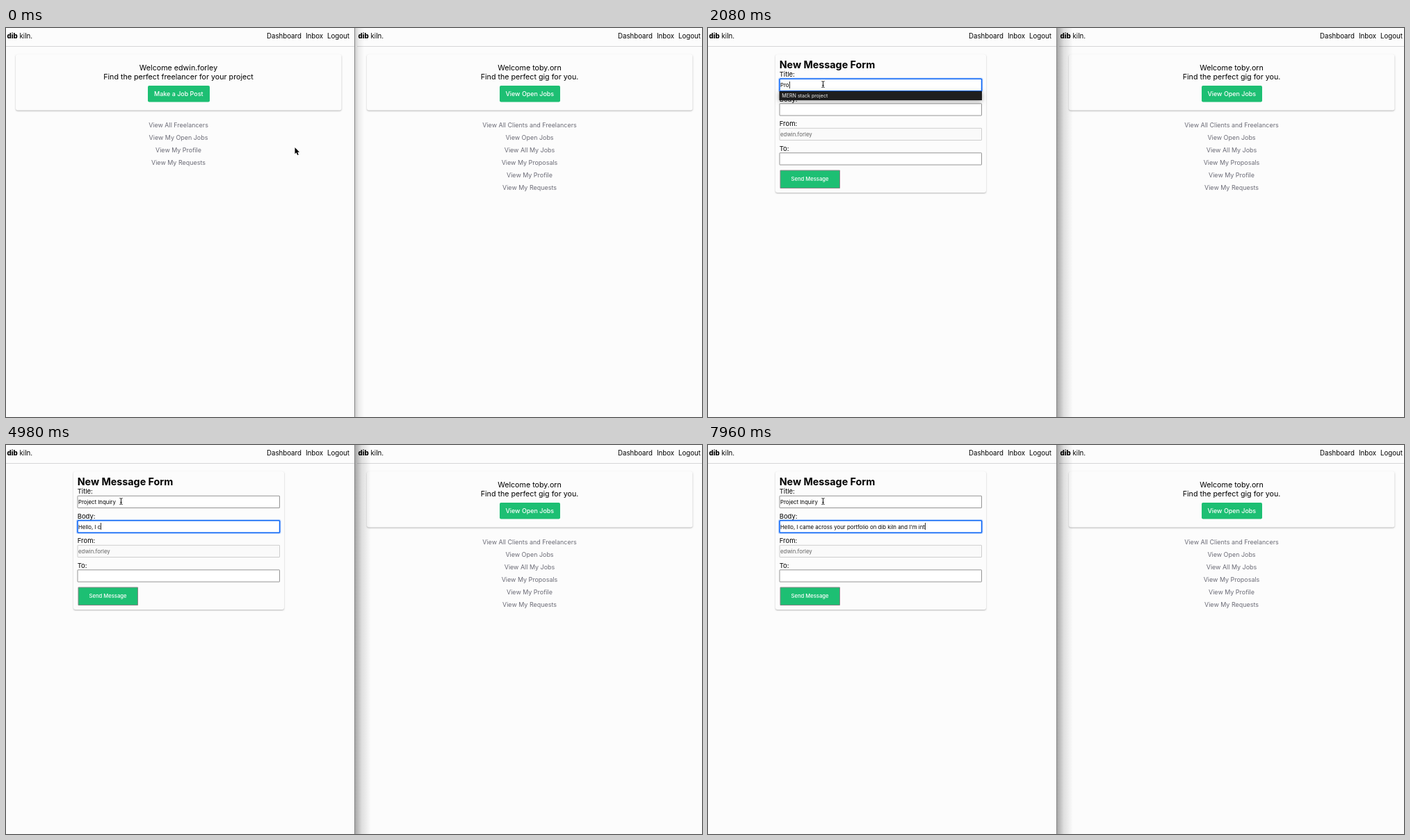
An HTML page with a canvas that plays this animation: 1001 px wide and 560 px high, repeating every 8 s.

```html
<!DOCTYPE html>
<html lang="en">
<head>
<meta charset="utf-8">
<title>Message form</title>
<style>
html, body { margin: 0; width: 100%; height: 100%; overflow: hidden; background: #fcfcfc; }
canvas { display: block; width: 1001px; height: 560px; }
</style>
</head>
<body>
<canvas id="stage"></canvas>
<script>
const W = 1001, H = 560, LOOP = 8000;
const PAGE = '#fcfcfc', INK = '#000', GREEN = '#1dbf73', GREY = '#6b6b76';
const CLIENT = 'edwin.forley', WORKER = 'toby.orn';
const TITLE = 'Project Inquiry';
const BODY = "Hello, I came across your portfolio on dib kiln and I'm int";

// [time, visible characters]
const TITLE_KEYS = [[1840, 0], [2080, 3], [2090, 3], [2530, 12], [2889, 12], [2940, 10],
  [3000, 10], [3280, 15], [3729, 15], [3780, 13], [3930, 13], [4030, 15]];
const BODY_KEYS = [[4580, 0], [4980, 10], [5410, 17], [5510, 17], [6100, 31], [6330, 35],
  [6455, 35], [7080, 47], [7435, 47], [7960, 59]];
const CARET_OFF = [[1370, 1570], [1720, 1920], [2680, 2830], [3430, 3580], [3780, 3980],
  [4280, 4480], [7280, 7480]];
// [time, x, y]
const POINTER = [[160, 415.5, 172], [390, 443, 8], [570, 443, 8], [890, 74, 59.5],
  [1010, 74, 59.5], [1170, 165.5, 81]];

const INBOX_AT = 570, FORM_AT = 880, FOCUS_AT = 1170, BODY_AT = 4080;

const canvas = document.getElementById('stage');
const ctx = canvas.getContext('2d');
const dpr = window.devicePixelRatio || 1;
canvas.width = W * dpr;
canvas.height = H * dpr;

const smooth = u => u * u * (3 - 2 * u);

function sample(keys, t, col, ease = u => u) {
  if (t <= keys[0][0]) return keys[0][col];
  for (let i = keys.length - 1; i >= 0; i--) {
    const a = keys[i], b = keys[i + 1];
    if (t < a[0]) continue;
    return b ? a[col] + (b[col] - a[col]) * ease((t - a[0]) / (b[0] - a[0])) : a[col];
  }
}

const typed = (text, keys, t) => text.slice(0, Math.floor(sample(keys, t, 1)));

function text(str, x, y, size, { weight = 400, color = INK, align = 'left' } = {}) {
  ctx.font = `${weight} ${size}px Inter, "Open Sans", sans-serif`;
  ctx.fillStyle = color;
  ctx.textAlign = align;
  ctx.fillText(str, x, y);
}

function box(x, y, w, h, r, color) {
  ctx.fillStyle = color;
  ctx.beginPath();
  ctx.roundRect(x, y, w, h, r);
  ctx.fill();
}

function outline(x, y, w, h, r, color, width) {
  ctx.strokeStyle = color;
  ctx.lineWidth = width;
  ctx.beginPath();
  ctx.roundRect(x, y, w, h, r);
  ctx.stroke();
}

function shadow(color, blur, dy, draw) {
  ctx.save();
  ctx.shadowColor = color;
  ctx.shadowBlur = blur * dpr;
  ctx.shadowOffsetY = dy * dpr;
  draw();
  ctx.restore();
}

function card(x, y, w, h) {
  shadow('rgba(0,0,0,.28)', 2, 1, () => box(x, y, w, h, 3, PAGE));
}

function header(x) {
  text('dib', x + 1.5, 15, 9.7, { weight: 800 });
  text('kiln.', x + 19.5, 15, 9.7);
  text('Dashboard', x + 375, 15, 9.7);
  text('Inbox', x + 431, 15, 9.7);
  text('Logout', x + 462, 15, 9.7);
  ctx.fillStyle = '#d6d6d8';
  ctx.fillRect(x, 26, 501, 1);
}

function dashboard(x, user, tagline, action, half, links) {
  const mid = x + 248, align = 'center';
  card(x + 14, 38, 468.5, 80.5);
  text('Welcome ' + user, mid, 61, 10.7, { align });
  text(tagline, mid, 74.3, 10.7, { align });
  box(mid + .5 - half, 83, half * 2, 23.5, 2, GREEN);
  text(action, mid + .3, 98, 8.95, { weight: 500, color: '#fff', align });
  links.forEach((label, i) => text(label, mid, 143 + i * 18, 8.95, { color: GREY, align }));
}

function field(label, y, value, state) {
  text(label, 102.7, y - 2, 9.5);
  if (state === 'focus') {
    outline(102, y + .5, 292.5, 19, 1.5, 'rgba(40,120,255,.28)', 2);
    box(102.5, y + 1, 291.5, 18, 1, '#fff');
    outline(103, y + 1.3, 290.6, 17.5, 1, '#0f68f5', 1.6);
  } else {
    const off = state === 'disabled';
    box(102.5, y + 1, 291.5, 17.5, 0, off ? '#fafafa' : '#fff');
    outline(103, y + 1.3, 290.5, 17.2, .5, off ? '#c9c9c9' : '#8a8a8a', .9);
  }
  text(value, 104, y + 13, 7.85, { color: state === 'disabled' ? '#626262' : INK });
}

function caret(value, y) {
  ctx.font = '400 7.85px Inter, "Open Sans", sans-serif';
  ctx.fillStyle = INK;
  ctx.fillRect(Math.round(104 + ctx.measureText(value).width), y, .8, 10);
}

function suggestion() {
  shadow('rgba(0,0,0,.35)', 6, 1.5, () => box(102.5, 91, 291.5, 13, 0, '#1e1e1f'));
  text('MERN stack project', 106.3, 100.3, 7.1, { color: '#efefef' });
}

function form(t) {
  const title = typed(TITLE, TITLE_KEYS, t), body = typed(BODY, BODY_KEYS, t);
  const onBody = t >= BODY_AT, onTitle = t >= FOCUS_AT && !onBody;
  card(97, 38, 303, 199);
  text('New Message Form', 102.7, 58, 14.3, { weight: 700 });
  field('Title:', 72, title, onTitle ? 'focus' : '');
  field('Body:', 107.5, body, onBody ? 'focus' : '');
  field('From:', 143, CLIENT, 'disabled');
  field('To:', 178.5, '', '');
  box(103.5, 204.5, 86.5, 26.5, 1, '#858585');
  box(104.5, 205.5, 84.5, 24.5, 0, GREEN);
  text('Send Message', 146.5, 220, 7.65, { weight: 500, color: '#fff', align: 'center' });

  const lit = !CARET_OFF.some(([a, b]) => t >= a && t < b);
  if (lit && onTitle) caret(title, 77);
  if (lit && onBody) caret(body, 112);
  if (t < 2500 && title.length > 0 && title.length < 9) suggestion();
}

function divider(active) {
  const reach = active ? 24 : 14, dark = active ? .36 : .2;
  const g = ctx.createLinearGradient(501, 0, 501 + reach, 0);
  g.addColorStop(0, `rgba(0,0,0,${dark})`);
  g.addColorStop(.45, `rgba(0,0,0,${dark * .33})`);
  g.addColorStop(1, 'rgba(0,0,0,0)');
  ctx.fillStyle = g;
  ctx.fillRect(501, 0, reach, H);
  ctx.fillStyle = '#858585';
  ctx.fillRect(501, 0, 1, H);
}

function arrow(x, y) {
  ctx.save();
  ctx.translate(x, y);
  ctx.lineJoin = 'round';
  const shape = new Path2D('M0 0V9.2L2.1 7.3L3.7 11L5.3 10.3L3.7 6.7H6.5Z');
  ctx.strokeStyle = '#fff';
  ctx.lineWidth = 1.4;
  ctx.stroke(shape);
  ctx.fillStyle = INK;
  ctx.fill(shape);
  ctx.restore();
}

function beam(x, y) {
  ctx.save();
  ctx.translate(x, y);
  ctx.strokeStyle = INK;
  ctx.lineWidth = .9;
  ctx.stroke(new Path2D('M-2 -4.5Q0 -4.5 0 -3.3Q0 -4.5 2 -4.5M0 -3.5V3.5M-2 4.5Q0 4.5 0 3.3Q0 4.5 2 4.5M-1.2 1.5H1.2'));
  ctx.restore();
}

function draw(t) {
  ctx.setTransform(dpr, 0, 0, dpr, 0, 0);
  ctx.fillStyle = PAGE;
  ctx.fillRect(0, 0, W, H);

  header(0);
  if (t < INBOX_AT) {
    dashboard(0, CLIENT, 'Find the perfect freelancer for your project', 'Make a Job Post', 44.5,
      ['View All Freelancers', 'View My Open Jobs', 'View My Profile', 'View My Requests']);
  } else if (t >= FORM_AT) {
    form(t);
  }

  header(505);
  dashboard(505, WORKER, 'Find the perfect gig for you.', 'View Open Jobs', 43.5,
    ['View All Clients and Freelancers', 'View Open Jobs', 'View All My Jobs',
      'View My Proposals', 'View My Profile', 'View My Requests']);
  divider(t >= 390);

  const x = sample(POINTER, t, 1, smooth), y = sample(POINTER, t, 2, smooth);
  (t < FOCUS_AT ? arrow : beam)(x, y);
}

function tick() {
  draw(performance.now() % LOOP);
  requestAnimationFrame(tick);
}
tick();
</script>
</body>
</html>
```
